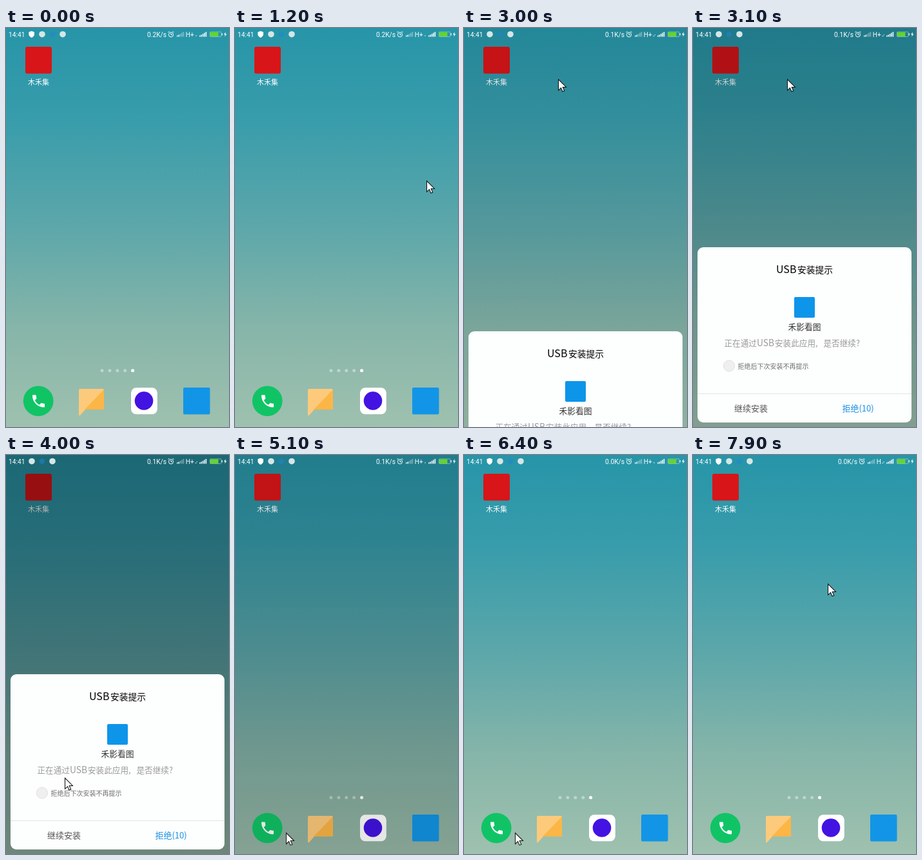
An HTML page that plays this animation: 346 by 617 pixels, repeating every 8 s.

```html
<!DOCTYPE html>
<html lang="zh-CN">
<head>
<meta charset="utf-8">
<title>USB安装提示</title>
<style>
  html, body { margin: 0; width: 100%; height: 100%; overflow: hidden; }
  svg { display: block; width: 346px; height: 617px; }
  text { font-family: "Noto Sans CJK SC", "Noto Sans CJK", sans-serif; }
  #status text { font: 10.2px Roboto, sans-serif; fill: #fff; }
  .mid { text-anchor: middle; }
  .medium { font-weight: 500; }
</style>
</head>
<body>
<svg viewBox="0 0 346 617">
  <defs>
    <linearGradient id="sky" x2="0" y2="1">
      <stop offset="0" stop-color="#2795a8"/>
      <stop offset=".22" stop-color="#379cab"/>
      <stop offset=".5" stop-color="#5da7aa"/>
      <stop offset=".75" stop-color="#86b5a9"/>
      <stop offset="1" stop-color="#9fc1af"/>
    </linearGradient>
  </defs>

  <rect width="346" height="617" fill="url(#sky)"/>
  <rect id="dim" width="346" height="617"/>

  <g id="home">
    <rect x="30" y="29" width="41" height="41.5" rx="3" fill="#d81518"/>
    <text class="mid" x="50.5" y="88" font-size="11" fill="#fff">木禾集</text>
    <g id="dots" fill="#fff"></g>

    <circle cx="50.2" cy="576.8" r="23.4" fill="#10c466"/>
    <path transform="translate(37.8 564.2) scale(1.06)" fill="#fff" d="M6.6 10.8c1.4 2.8 3.8 5.1 6.6 6.6l2.2-2.2c.3-.3.7-.4 1-.2 1.1.4 2.3.5 3.6.5.6 0 1 .5 1 1V20c0 .6-.4 1-1 1C10.6 21 3 13.4 3 4c0-.6.4-1 1-1h3.5c.5 0 1 .4 1 1 0 1.2.2 2.4.5 3.6.1.3 0 .7-.2 1z"/>

    <path fill="#fdca7c" d="M115 558h35q2 0 2 2v28q0 2-2 2h-27l-8 9q-2 1-2-1v-38q0-2 2-2z"/>
    <path fill="#fcb646" d="M152 559v29q0 2-2 2h-28z"/>

    <rect x="194" y="556.3" width="40.8" height="41" rx="8" fill="#fff"/>
    <circle cx="214" cy="576.5" r="14.3" fill="#4313e2"/>

    <rect x="275" y="556" width="41.5" height="41.5" rx="2" fill="#1295e6"/>
  </g>

  <g id="status">
    <text x="4" y="13.8">14:41</text>
    <path id="shield" fill="#fff" d="M39.7 4.8l4.3 1.5v3.7q-.3 3-4.3 5-4-2-4.3-5v-3.700z"/>
    <g id="notices">
      <circle cx="56" cy="9.700" r="4.800" fill="#d6e6e6"/>
      <circle cx="72" cy="9.700" r="4.300" fill="#1e86d6" opacity=".5"/>
      <circle cx="88" cy="9.700" r="4.800" fill="#d6e6e6"/>
    </g>
    <g id="network">
      <text id="speed" x="219" y="13.500"></text>
      <g fill="none" stroke="#fff">
        <circle cx="256" cy="10.300" r="3.600"/>
        <path d="M256 8v2.500h2M251.500 7l2-2M260.500 7l-2-2"/>
      </g>
      <g id="weakBars" fill="#fff"></g>
      <text id="mode" x="278.700" y="13.500"></text>
    </g>
    <path id="traffic" stroke="#fff" opacity=".8"/>
    <g id="strongBars" fill="#fff"></g>
    <rect x="316.500" y="6" width="17.500" height="7.500" rx="1" fill="none" stroke="#b9d2d2" opacity=".6"/>
    <rect x="317" y="6.500" width="12.500" height="6.500" fill="#62d62c"/>
    <rect x="334.500" y="8" width="1.500" height="3.500" fill="#d6e6e6"/>
    <path fill="#fff" d="M341 6l-3 4.300h2l-.6 3.200 3-4.300h-2z"/>
  </g>

  <g id="sheet">
    <rect x="7" y="339" width="332" height="271" rx="9" fill="#fdfefe"/>
    <text class="medium" y="378.500" font-size="13.750"><tspan x="129" font-size="16">USB</tspan><tspan x="162">安装提示</tspan></text>
    <rect x="157" y="416" width="32" height="32" rx="2" fill="#0d95ea"/>
    <text class="mid" x="173" y="467" font-size="12.800" fill="#333">禾影看图</text>
    <text y="491.500" font-size="12.600" fill="#999"><tspan x="48.500">正在通过</tspan><tspan x="99" font-size="13.800">USB</tspan><tspan x="127">安装此应用,</tspan><tspan x="202.500">是否继续?</tspan></text>
    <circle cx="56" cy="522.500" r="8.600" fill="#efefef" stroke="#e0e0e0"/>
    <text x="69.500" y="526.700" font-size="10" fill="#6c6c6c">拒绝后下次安装不再提示</text>
    <path d="M7 565.500h332" stroke="#e3e5e5"/>
    <text class="mid medium" x="90" y="593" font-size="13" fill="#555">继续安装</text>
    <text class="mid medium" id="refuse" x="256" y="593" font-size="13" fill="#1b91e4"></text>
  </g>

  <g id="cursor">
    <path transform="scale(1.05)" fill="#fff" stroke="#111" d="M.5.5v16l3.800-3.600 2.400 5.500 2.600-1.100-2.400-5.400h5z"/>
  </g>
</svg>

<script>
const LOOP = 8000, STEP = 100;
const $ = id => document.getElementById(id);

// Rows of [time, value, ...]
const cursorPath = [
  [1200, 297, 236], [1500, 212, 145], [1800, 146, 79],
  [3500, 146, 79], [3600, 146, 110], [3700, 143, 245], [3800, 130, 390],
  [3900, 97, 472], [4000, 91, 499], [4400, 78, 576], [4500, 79, 584],
  [7100, 79, 584], [7300, 90, 540], [7700, 195, 255], [7900, 209, 199]
];
const wallpaperDim = [
  [2900, 0], [3000, .09], [3100, .18], [3400, .3],
  [4900, .3], [5000, .23], [5200, .09], [5700, 0]
];
// Icons regain full brightness before the wallpaper does.
const iconDim = [[2900, 0], [3100, .18], [3400, .3], [4900, .3], [5200, 0]];
const sheetDrop = [[2900, 280], [3000, 130], [3100, 0], [4900, 0], [5000, 150], [5100, 280]];

function sample(rows, t) {
  const next = rows.findIndex(row => row[0] > t);
  if (next === 0) return rows[0].slice(1);
  if (next < 0) return rows[rows.length - 1].slice(1);
  const a = rows[next - 1], b = rows[next];
  const k = (t - a[0]) / (b[0] - a[0]);
  return a.slice(1).map((v, i) => v + (b[i + 1] - v) * k);
}

function bars(id, x, opacity) {
  $(id).innerHTML = [2, 3, 4.5, 6, 7.5].map((h, i) =>
    `<rect x="${x + i * 2.4}" y="${13.5 - h}" width="1.6" height="${h}" opacity="${opacity(i)}"/>`).join("");
}
bars("weakBars", 265, i => i < 2 ? .9 : .4);
bars("strongBars", 300, () => .95);

$("dots").innerHTML = [0, 1, 2, 3, 4].map(i =>
  `<circle cx="${149 + i * 11.9}" cy="529.8" r="2.5" opacity="${i === 4 ? 1 : .4}"/>`).join("");

const show = (id, visible) => $(id).setAttribute("visibility", visible ? "visible" : "hidden");
const move = (id, x, y) => $(id).setAttribute("transform", `translate(${x} ${y})`);

function draw(t) {
  const asking = t >= 3000 && t < 5100;
  show("shield", !asking);
  move("notices", asking ? -16 : 0, 0);

  $("speed").textContent = t < 2700 ? "0.2K/s" : t < 6400 ? "0.1K/s" : "0.0K/s";
  $("mode").textContent = t < 6800 ? "H+" : "H";
  move("network", t < 6800 ? 0 : 6, 0);
  const busy = (t >= 2800 && t < 5000) || t >= 6500;
  $("traffic").setAttribute("d", busy ? "M293.5 12.5h2M295.5 10.5h1.5" : "M294 12h2");

  $("dim").setAttribute("opacity", sample(wallpaperDim, t)[0]);
  $("home").style.filter = `brightness(${1 - sample(iconDim, t)[0]})`;
  show("sheet", asking);
  move("sheet", 0, sample(sheetDrop, t)[0]);
  $("refuse").textContent = t < 4500 ? "拒绝(10)" : "拒绝(9)";

  show("cursor", t >= 1200);
  move("cursor", ...sample(cursorPath, t));
}

const start = performance.now();
function frame() {
  const t = (performance.now() - start) % LOOP;
  draw(Math.floor(t / STEP) * STEP);
  requestAnimationFrame(frame);
}
frame();
</script>
</body>
</html>
```
